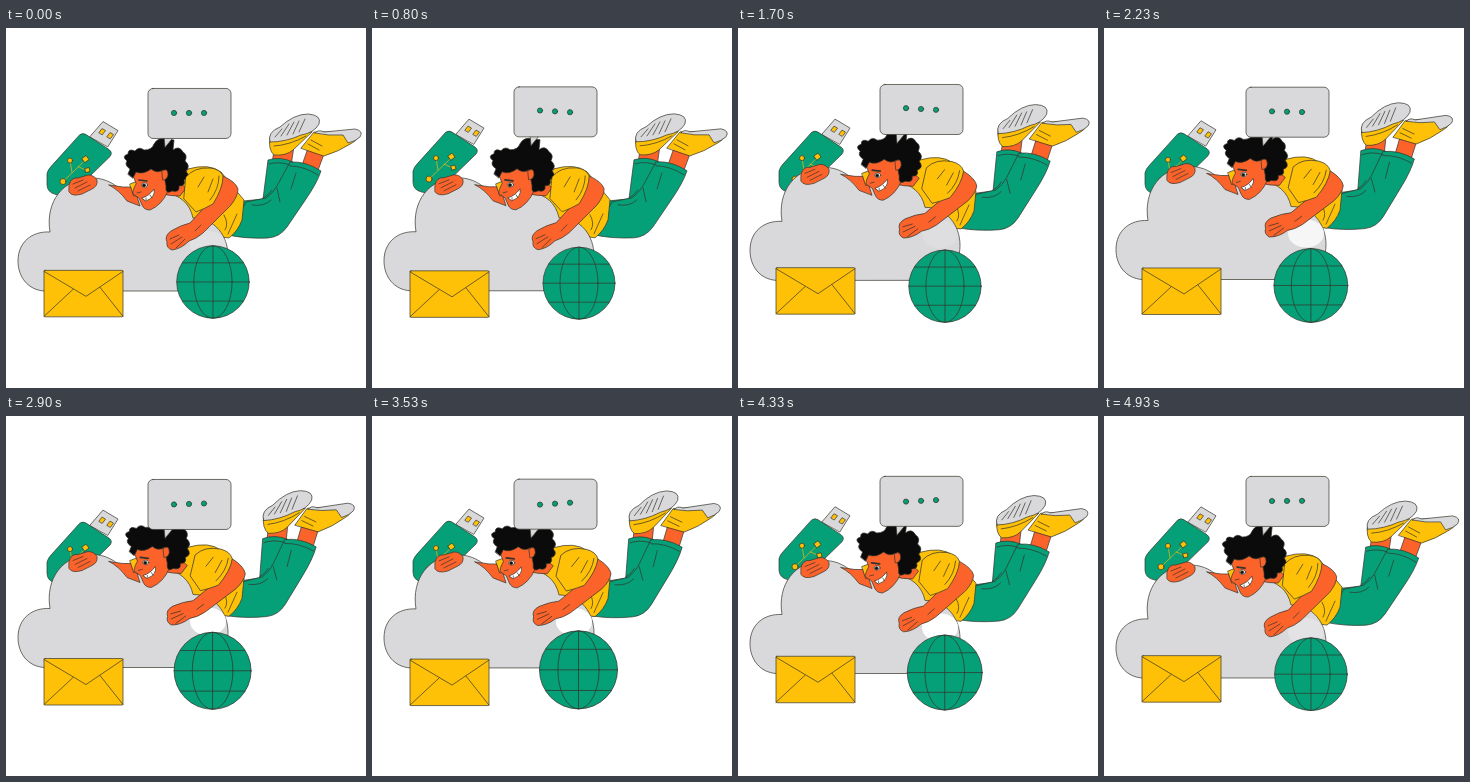
These frames come from a looping animation (360x360 px, 5000 ms). An HTML page:

```html
<!DOCTYPE html>
<html lang="en">
<head>
<meta charset="utf-8">
<title>Cloud files</title>
<style>
  html, body { margin: 0; width: 100%; height: 100%; overflow: hidden; background: #fff; }
  svg { display: block; width: 100vw; height: 100vh; }
  .art { stroke: #34342c; stroke-width: .7; stroke-linejoin: round; stroke-linecap: round; }
  .gray { fill: #d9d9db; }
  .green { fill: #05a078; }
  .yellow { fill: #ffc107; }
  .skin { fill: #fb632b; }
  .black { fill: #0b0b0b; }
  .white { fill: #fff; }
  .line { fill: none; }
  .bare { stroke: none; }
  .gold { fill: none; stroke: #f2b90f; }
</style>
</head>
<body>
<svg viewBox="0 0 360 360">
<g class="art">

  <g id="usb">
    <path class="gray" d="M84 109L97 94L112 103L102 119Z"/>
    <path class="yellow" d="M93 105l3-4 3.500 2-3 4ZM101 109l3-4 3.500 2-3 4Z"/>
    <path class="green" d="M74 107Q77 105 80 107L103 122Q107 125 104 129L69 163Q60 170 50 167Q41 165 41 157V146Q42 142 45 139Z"/>
    <path class="gold" d="M56 155L81 131M66 145L64 133M72 139L81 143"/>
    <g class="yellow">
      <circle cx="57" cy="154" r="3"/>
      <circle cx="64" cy="133" r="2.500"/>
      <path d="M76 131l4-3 3 4-4 3ZM79 141l4-1 1 4-4 1Z"/>
    </g>
  </g>

  <g id="legs">
    <path class="skin" d="M266 136L268 122L288 118L285 138ZM295 140L302 120L318 126L311 145Z"/>
    <path class="yellow" d="M264 109Q262 122 268 127Q280 128 287 122L306 104Z"/>
    <path class="gray" d="M264 114Q261 104 274 99Q288 86 302 86Q316 87 313 96Q308 105 295 107Q280 114 264 114Z"/>
    <path class="line" d="M269 109l7-8M275 108l8-12M281 107l7-13M287 106l6-13M293 104l6-13M268 118q16-1 32-10"/>
    <path class="yellow" d="M295 120L308 104L352 104Q355 110 346 115Q332 124 318 128Z"/>
    <path class="gray" d="M309 105Q312 101 318 104L349 101Q358 103 354 109Q350 113 342 115L337 107Q322 108 309 105Z"/>
    <path class="line" d="M305 112l11 6M302 116l11 6"/>
    <path class="green" d="M222 206L237 173L257 171L262 132Q274 128 287 134L284 178L250 208Z"/>
    <path class="green" d="M222 207L240 174L260 170Q268 164 271 158L284 134Q300 133 315 143Q311 155 300 171L281 199Q274 209 262 210Q240 211 222 207Z"/>
    <path class="line" d="M284 138Q298 138 312 147M263 136q10-3 21 1M257 170Q262 168 266 162M271 160l3 14M246 177q12 2 19-5M290 145l-5 16"/>
  </g>

  <g id="back">
    <path class="yellow" d="M166 165L182 141Q203 135 215 144L228 160L238 172L236 192Q232 203 223 210Q200 208 182 198Z"/>
    <path class="line" d="M231 186l-9 20M218 187q5 9 1 15"/>
  </g>

  <g id="cloud">
    <path class="gray" d="M38 263C22 262 12 249 12 233C12 214 26 203 44 204C39 174 57 150 86 150C103 150 116 160 124 174C143 158 181 160 187 190C209 190 222 208 222 228C222 250 208 263 190 263Z"/>
    <ellipse id="gleam" class="white bare" cx="202" cy="217" rx="18" ry="14"/>
    <path class="skin" d="M103 157L117 159L128 159L134 178L121 173Q113 162 103 157Z"/>
    <path class="yellow" d="M124 156l8-3 3 14-7 1Z"/>
    <path class="skin" d="M63 157Q65 149 72 150L82 147Q88 147 91 152Q92 158 86 161L76 166Q66 169 63 164Z"/>
    <path class="line" d="M67 156l10-4M69 160l12-6M72 163l12-6"/>
  </g>

  <g id="head">
    <path class="skin" d="M154 158L170 152L180 160L174 168Q164 168 157 166Z"/>
    <path class="skin" d="M126 144L158 136Q166 150 162 163Q156 177 144 182Q138 182 136 177L133 170L127 166Q126 163 130 156Z"/>
    <path class="black" d="M122 146L124 141Q118 137 121 133Q115 128 122 126Q122 120 129 123Q133 118 138 122Q146 122 148 116Q152 109 160 111L168 112L167 122Q173 117 177 124Q182 127 179 133Q185 138 180 143Q185 149 178 152Q180 158 173 158Q174 165 166 163Q159 167 160 158L157 142Q151 146 145 141Q137 147 130 144L127 150Z"/>
    <path class="skin" d="M156 143Q162 139 162 147Q161 152 157 152Z"/>
    <ellipse class="white" cx="138.500" cy="157" rx="3" ry="2.300"/>
    <circle class="black" cx="138" cy="157.300" r="1.500"/>
    <path class="line" stroke-width="1.700" d="M133 152l8 1"/>
    <path class="white" d="M136 170Q143 168 148 161Q150 169 140 173Z"/>
    <path class="line" d="M140 170v2M144 167l2 3M131 165l4-1"/>
  </g>

  <g id="arm">
    <path class="skin" d="M207 146L217 148Q230 154 232 161Q232 168 225 177L197 205Q190 211 183 213Q175 221 166 222Q160 220 161 214Q158 208 165 203Q175 197 184 195L205 172Z"/>
    <path class="line" d="M164 211l9-4M165 216l11-7M170 220l9-9M189 203l6-6"/>
    <path class="yellow" d="M180 149Q188 139 204 140Q214 141 217 148Q217 160 207 176Q198 181 190 184L178 171Z"/>
    <path class="line" d="M213 148q0 13-9 24M198 149l-6 10M207 151l-5 13"/>
  </g>

  <g id="bubble">
    <path class="gray" d="M158 110L159 121L168 110Z"/>
    <rect class="gray" x="142" y="62" width="83" height="50" rx="5"/>
    <g id="dots" class="green">
      <circle cx="168" r="2.600"/><circle cx="183" r="2.600"/><circle cx="198" r="2.600"/>
    </g>
  </g>

  <g id="mail">
    <rect class="yellow" x="38" y="243" width="79" height="46.500" rx="1"/>
    <path class="line" d="M38 244L80 269L117 244M38 289L67 262M117 289L94 260"/>
  </g>

  <g id="globe">
    <circle class="green" r="36"/>
    <path class="line" d="M0-36V36M-36 0H36M-30-19H30M-30 19H30"/>
    <ellipse class="line" rx="19" ry="36"/>
  </g>
</g>
</svg>
<script>
const LOOP = 5, TAU = 2 * Math.PI;
const { sin, cos, min, max } = Math;

const el = id => document.getElementById(id);
const dots = [...el('dots').children];
const place = (id, x, y, extra = '') =>
  el(id).setAttribute('transform', `translate(${x} ${y}) ${extra}`);

// Smooth step from 0 to 1 between two times in seconds.
function ease(from, to, t) {
  const u = min(1, max(0, (t - from) / (to - from)));
  return u * u * (3 - 2 * u);
}
// Floating motion, highest at the time `peak`.
const bob = (amp, peak, period, t) => -amp * cos(TAU * (t - peak) / period);

function draw(t) {
  const w = TAU * t / LOOP;

  // The cloud lifts and carries the figure; the legs follow a little later.
  const rise = ease(.7, 1.9, t) * (1 - ease(3.3, 5.3, t));
  const kick = ease(.8, 2.4, t) * (1 - ease(4, 5.1, t));
  const lift = -11.5 * rise;
  place('cloud', 0, lift);
  place('back', 0, lift * .85);
  place('head', 1.3 * rise, lift * .92);
  place('arm', rise, lift, `rotate(${8 * rise} 176 210)`);
  place('legs', -2 * kick, -8 * rise, `rotate(${-3 * kick} 235 195)`);

  place('usb', 0, -1.7 + bob(1.8, 1.25, 3.35, t));
  place('mail', 0, -1.6 + bob(1.9, 1.9, 2.85, t));
  place('bubble', 0, -1.8 - 2.7 * sin(w + .14) + 1.67 * sin(2 * w + .39));
  dots.forEach((dot, i) => dot.setAttribute('cy', 86.5 + (i - 1) * sin(w)));

  const swell = ((1 + cos(w - TAU * .68)) / 2) ** 2;
  place('globe', 207 - swell / 2, 256 + bob(2.2, 3.4, 3.2, t), `scale(${1 + .085 * swell})`);
  el('gleam').style.opacity = min(1, 2.5 * swell);
}

let start;
function tick(now) {
  start ??= now;
  draw((now - start) / 1000 % LOOP);
  requestAnimationFrame(tick);
}
draw(0);
requestAnimationFrame(tick);
</script>
</body>
</html>
```
